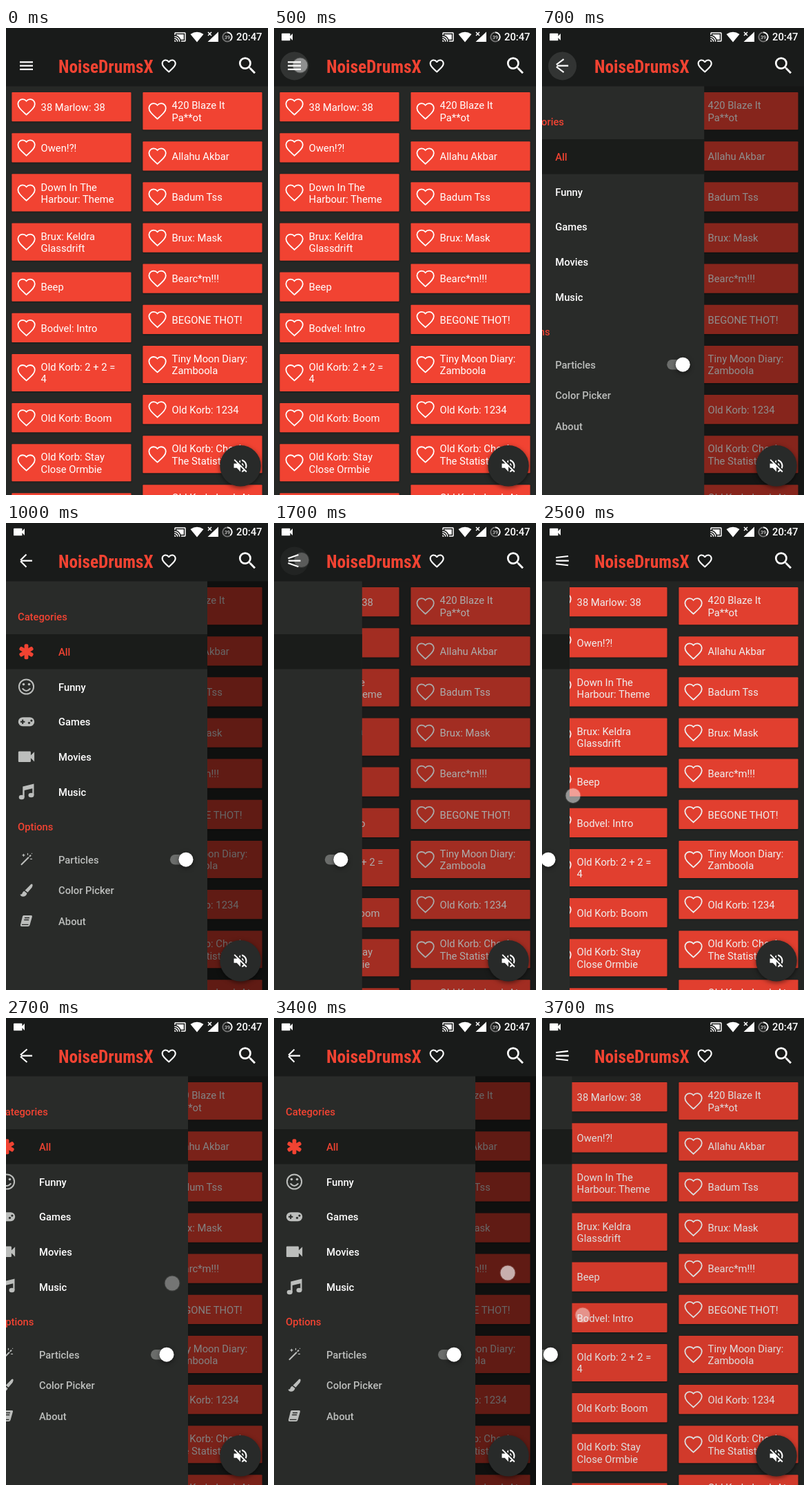
Write an HTML page that moves like this. It is 380 by 676 pixels and loops after 3.8 s.

```html
<!DOCTYPE html>
<html lang="en">
<head>
<meta charset="utf-8">
<title>Sound board</title>
<style>
  html, body { margin: 0; width: 100%; height: 100%; overflow: hidden; background: #262826; }
  svg { display: block; width: 380px; height: 676px; font: 14.78px Roboto, sans-serif; fill: #fff; }
  .medium { font-weight: 500; }
  .title { font: 700 25.3px "Roboto Condensed", Roboto, sans-serif; font-stretch: 75%; }
  .red { fill: #f14332; }
  .grey { fill: #bcbebc; }
  .line { fill: none; stroke: #bcbebc; stroke-width: 2; stroke-linecap: round; }
  .outline { fill: none; stroke: #fff; stroke-width: 1.45; }
  .card { fill: #f14332; filter: drop-shadow(0 1px 1px rgba(0, 0, 0, .35)); }
  .raised { filter: drop-shadow(0 2px 3px rgba(0, 0, 0, .5)); }
</style>
</head>
<body>
<svg id="stage" viewBox="0 0 380 676"></svg>
<script>
const LOOP = 3800, STEP = 100, DRAWER = 292, DP = 380 / 360;
const LINE = 17.3, BASELINE = 5.7, SCRIM_LAG = 20;

// Icon outlines on a 24-unit grid
const HEART = 'M16.5 3c-1.74 0-3.41.81-4.5 2.09C10.91 3.81 9.24 3 7.5 3 4.42 3 2 5.42 2 8.5c0 3.78 3.4 6.86 8.55 11.54L12 21.35l1.45-1.32C18.6 15.36 22 12.28 22 8.5 22 5.42 19.58 3 16.5 3z';
const HEART_HOLE = 'm-4.4 15.55l-.1.1-.1-.1C7.14 14.24 4 11.39 4 8.5 4 6.5 5.5 5 7.5 5c1.54 0 3.04.99 3.57 2.36h1.87C13.46 5.99 14.96 5 16.5 5c2 0 3.5 1.5 3.5 3.5 0 2.89-3.14 5.74-7.9 10.05z';
const SEARCH = 'M15.5 14h-.79l-.28-.27A6.47 6.47 0 0 0 16 9.5 6.5 6.5 0 1 0 9.5 16c1.61 0 3.09-.59 4.23-1.57l.27.28v.79l5 4.99L20.49 19zm-6 0C7.01 14 5 11.99 5 9.5S7.01 5 9.5 5 14 7.01 14 9.5 11.99 14 9.5 14z';
const CAMERA = 'M17 10.5V7c0-.55-.45-1-1-1H4c-.55 0-1 .45-1 1v10c0 .55.45 1 1 1h12c.55 0 1-.45 1-1v-3.5l4 4v-11z';
const CAST = 'M21 3H3c-1.1 0-2 .9-2 2v3h2V5h18v14h-7v2h7c1.1 0 2-.9 2-2V5c0-1.1-.9-2-2-2zM1 18v3h3c0-1.66-1.34-3-3-3zm0-4v2c2.76 0 5 2.24 5 5h2c0-3.87-3.13-7-7-7zm0-4v2c4.97 0 9 4.03 9 9h2c0-6.08-4.93-11-11-11zM19 7H5v1.63c3.96 1.28 7.09 4.41 8.37 8.37H19z';
const MUTED = 'M16.5 12c0-1.77-1.02-3.29-2.5-4.03v2.21l2.45 2.45c.03-.2.05-.41.05-.63zm2.5 0c0 .94-.2 1.82-.54 2.64l1.51 1.51C20.63 14.91 21 13.5 21 12c0-4.28-2.99-7.86-7-8.77v2.06c2.89.86 5 3.54 5 6.71zM4.27 3L3 4.27 7.73 9H3v6h4l5 5v-6.73l4.25 4.25c-.67.52-1.42.93-2.25 1.18v2.06c1.38-.31 2.63-.95 3.69-1.81L19.73 21 21 19.73l-9-9zM12 4L9.91 6.09 12 8.18z';

const COLUMNS = [
  ['38 Marlow: 38', 'Owen!?!', 'Down In The|Harbour: Theme', 'Brux: Keldra|Glassdrift', 'Beep', 'Bodvel: Intro',
   'Old Korb: 2 + 2 =|4', 'Old Korb: Boom', 'Old Korb: Stay|Close Ormbie', ' '],
  ['420 Blaze It|Pa**ot', 'Allahu Akbar', 'Badum Tss', 'Brux: Mask', 'Bearc*m!!!', 'BEGONE THOT!',
   'Tiny Moon Diary:|Zamboola', 'Old Korb: 1234', 'Old Korb: Check|The Statistics', 'Old Korb: Look At|The Time'],
];

const text = (x, y, label, cls = '') => `<text x="${x}" y="${y + BASELINE}" class="${cls}">${label}</text>`;
const icon = (path, x, y, size, cls = '') =>
  `<path d="${path}" class="${cls}" transform="translate(${x} ${y}) scale(${size / 24}) translate(-12 -12)"/>`;

function column(labels, x) {
  let top = 93.1;
  return labels.map(label => {
    const lines = label.split('|');
    const height = lines.length > 1 ? 54.2 : 42.2;
    const middle = top + height / 2;
    top += height + 16.93;
    return `<rect class="card" x="${x}" y="${middle - height / 2}" width="173.1" height="${height}" rx="1"/>`
      + icon(HEART, x + 21.2, middle, 29.3, 'outline')
      + lines.map((s, i) => text(x + 42.2, middle + (i - (lines.length - 1) / 2) * LINE, s)).join('');
  }).join('');
}

// Drawer symbols, centred on 0,0
const asterisk = [0, 60, 120].map(a => `<rect x="-2.9" y="-11" width="5.8" height="22" rx="2" class="red" transform="rotate(${a})"/>`).join('');
const smiley = '<circle r="10.6" class="line"/><path class="line" d="M-5.2 3Q0 9 5.2 3"/><g class="grey"><circle cx="-4" cy="-3.5" r="1.8"/><circle cx="4" cy="-3.5" r="1.8"/></g>';
const gamepad = '<rect x="-11.7" y="-6.5" width="23.4" height="13" rx="6.5" class="grey"/><path d="M-8.5 0h6.4M-5.3-3.2v6.4" stroke="#292b29" stroke-width="2"/><g fill="#292b29"><circle cx="4" cy="1.6" r="1.6"/><circle cx="7.4" cy="-1.6" r="1.6"/></g>';
const music = '<g class="grey"><ellipse cx="-6.8" cy="8" rx="4" ry="3.2"/><ellipse cx="7" cy="5" rx="4" ry="3.2"/><path d="M-5.2-7.5L11-11.5V5H8.8V-4.8L-2.8-2V8h-2.4z"/></g>';
const wand = '<path class="line" d="M-7 7L3-3M5-5l1-1"/><path class="line" style="stroke-width:1.3" d="M-4-8v3M-5.5-6.5h3M2-9v2M8-1h-2M8-9h.1"/>';
const brush = '<path class="grey" d="M8.5-9Q10-8 8-4L2 3-2 0 5-7Q7-9.5 8.5-9zM-3 1L1 4.3Q0 9-5 9-8 9-9 6-6 6-5.6 3.5-5 1.5-3 1z"/>';
const book = '<path class="grey" d="M-4-8H7Q9-8 8.4-6L5 6Q4.4 8 2.5 8H-6.5Q-9 8-8.5 5.5L-5.5-6.5Q-5-8-4-8z"/><path d="M-2.5-4.5h7M-3.3-1.5h7M-6.5 5.3H3" stroke="#292b29" stroke-width="1.3"/>';

const entries = [
  [186.3, 'All', asterisk, 'red'],
  [237, 'Funny', smiley],
  [287.7, 'Games', gamepad],
  [338.3, 'Movies', icon(CAMERA, 0, 0, 31, 'grey')],
  [389, 'Music', music],
  [487.3, 'Particles', wand, 'grey'],
  [531.7, 'Color Picker', brush, 'grey'],
  [576, 'About', book, 'grey'],
];

document.getElementById('stage').innerHTML = `
  <rect width="380" height="676" fill="#262826"/>
  ${column(COLUMNS[0], 8.4)}${column(COLUMNS[1], 198.4)}
  <rect id="scrim" y="84" width="380" height="592" fill="#000"/>
  <g id="drawer">
    <rect y="84" width="${DRAWER}" height="592" fill="#292b29"/>
    <rect y="161" width="${DRAWER}" height="50.5" fill="#1a1c1a"/>
    ${text(17, 135.4, 'Categories', 'medium red')}${text(17, 439.4, 'Options', 'medium red')}
    ${entries.map(([y, label, symbol, cls = '']) =>
      `<g transform="translate(29.5 ${y})">${symbol}</g>` + text(76, y, label, 'medium ' + cls)).join('')}
    <rect x="238" y="480" width="33" height="14.5" rx="7.2" fill="#6b6d6b"/>
    <circle class="raised" cx="261" cy="487.2" r="10.5"/>
  </g>
  <rect width="380" height="84.4" fill="#191b1a"/>
  <circle id="ripple" cx="29.6" cy="54.9" r="20.5"/>
  <path id="menu" transform="translate(29.5 54.6) scale(${DP})" fill="none" stroke="#fff" stroke-width="2"/>
  <text x="76" y="64.5" class="title red">NoiseDrumsX</text>
  ${icon(HEART + HEART_HOLE, 236.2, 55, 25.3)}${icon(SEARCH, 350.3, 54.5, 33)}
  <g id="recording">${icon(CAMERA, 19, 13, 21.3)}</g>
  ${icon(CAST, 252.5, 13, 18)}
  <path d="M277 20.5L267.5 9Q277 2.5 286.5 9zM308 5.5V20H292.5z"/>
  <path d="M293 6l5 5m0-5l-5 5" stroke="#fff" stroke-width="1.5"/>
  <g fill="none" stroke-width="1.8">
    <circle cx="321" cy="13" r="6.7" stroke="#777"/>
    <circle cx="321" cy="13" r="6.7" stroke="#fff" pathLength="100" stroke-dasharray="39 61" transform="rotate(-90 321 13)"/>
  </g>
  <text x="321" y="15.5" text-anchor="middle" style="font-size:7px">39</text>
  ${text(334, 12.6, '20:47', 'medium')}
  <circle class="raised" cx="340" cy="633.7" r="29.7" fill="#282a29"/>
  ${icon(MUTED, 340, 633.7, 25.3)}
  <circle id="touch" r="10.5" stroke="#fff" stroke-opacity=".25" stroke-width="2"/>`;

const [scrim, drawer, ripple, menu, recording, touch] =
  ['scrim', 'drawer', 'ripple', 'menu', 'recording', 'touch'].map(id => document.getElementById(id));

const clamp = v => Math.min(1, Math.max(0, v));
const mix = (a, b, p) => a + (b - a) * p;
const settle = ms => 1 - (1 - clamp(ms / 512)) ** 5;

// Values spaced one step apart, held at both ends
function along(values, ms) {
  const at = clamp(ms / STEP / (values.length - 1)) * (values.length - 1);
  const i = Math.min(Math.floor(at), values.length - 2);
  return mix(values[i], values[i + 1], at - i);
}

function drawerEdge(t) {
  if (t < 1600) return DRAWER * settle(t - 557);
  if (t < 2400) return DRAWER * (1 - settle(t - 1622));
  if (t < 3400) return along([0, 40, 150, 264, 288, DRAWER], t - 2400);
  return along([DRAWER, 276, 150, 43.5], t - 3400);
}

// x, y and opacity of the finger mark
function finger(t) {
  if (t >= 500 && t < 700) return [38, 54, .45];
  if (t >= 1500 && t < 1800) return [40, 53.5, t < 1700 ? .45 : .25];
  if (t >= 2400 && t < 2800) return [along([8, 45, 140, 241], t - 2400), mix(400, 384, (t - 2400) / 300), t < 2700 ? .5 : .35];
  if (t >= 3400) return [along([339, 290, 165, 59], t - 3400), mix(369, 430, (t - 3400) / 300), t < 3700 ? .65 : .45];
  return [0, 0, 0];
}

// Three bars folding into a left arrow
function menuPath(p) {
  const shaft = mix(18, 16, p), bar = mix(18, 11.3, p), angle = p * Math.PI / 4;
  const x = -shaft / 2, y = mix(5, .7, p), dx = bar * Math.cos(angle), dy = bar * Math.sin(angle);
  return `M${x + p} 0h${shaft - p}M${x} ${y}l${dx} ${dy}M${x} ${-y}l${dx} ${-dy}`;
}

function rippleOpacity(t) {
  const since = t < 1500 ? t - 500 : t - 1500;
  const peak = t < 1500 ? .11 : .04;
  return since < 0 ? 0 : peak * clamp((500 - since) / 300);
}

function render(t) {
  const edge = drawerEdge(t);
  const [x, y, opacity] = finger(t);
  drawer.setAttribute('transform', `translate(${edge - DRAWER} 0)`);
  scrim.setAttribute('opacity', .6 * drawerEdge(t - SCRIM_LAG) / DRAWER);
  menu.setAttribute('d', menuPath(edge / DRAWER));
  ripple.setAttribute('opacity', rippleOpacity(t));
  recording.setAttribute('opacity', t < 100 ? 0 : 1);
  touch.setAttribute('transform', `translate(${x} ${y})`);
  touch.setAttribute('opacity', opacity);
}

const start = performance.now();
function tick() {
  const t = (performance.now() - start) % LOOP;
  render(Math.floor(t / STEP) * STEP);
  requestAnimationFrame(tick);
}
tick();
</script>
</body>
</html>
```
